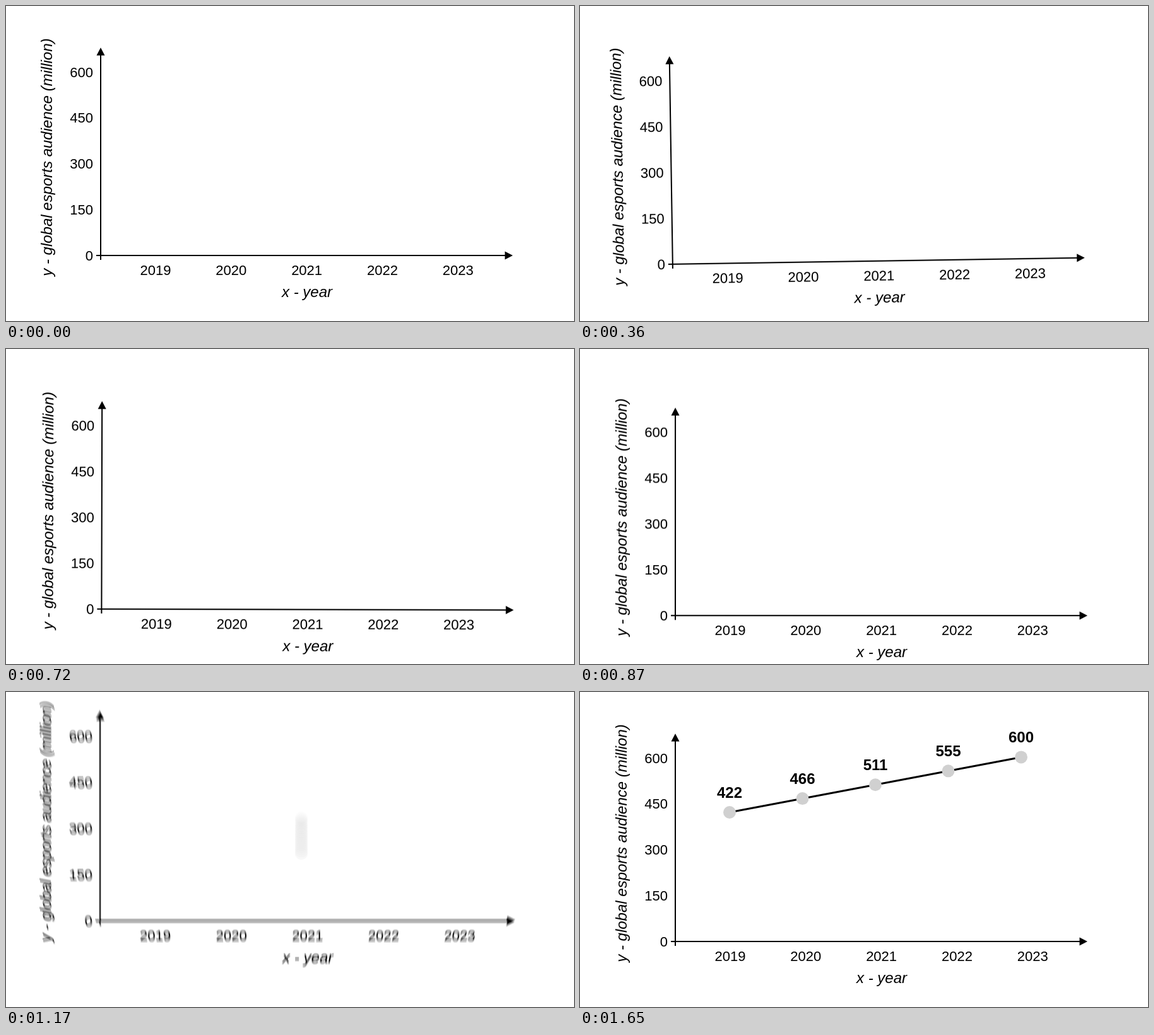
These frames come from a looping animation (900 by 500 pixels, 7200 ms). An HTML page with a canvas:

```html
<!DOCTYPE html>
<html lang="en">
<head>
<meta charset="utf-8">
<title>Audience chart</title>
<style>
  html, body { margin: 0; height: 100%; overflow: hidden; background: #fff; }
  canvas { display: block; }
</style>
</head>
<body>
<canvas id="stage" width="900" height="500"></canvas>
<script>
const LOOP = 7200, STEP = 30, END = 1650, SHUTTER = 16, SAMPLES = 20;
const SWAY_END = 870, FLING = 1123, RISE = 180;
const out = document.getElementById('stage').getContext('2d');
const layer = document.createElement('canvas');
layer.width = 900;
layer.height = 500;
const c = layer.getContext('2d');

const points = Array.from({ length: 5 }, (_, i) => {
  const value = 422 + 44.5 * i;
  return {
    value: Math.floor(value),
    x: 237 + 115.5 * i,
    y: 191 - 0.492 * (value - 422),
    start: FLING + 70 * (Math.abs(2 * i - 4) - (i < 2)) // from the middle outwards
  };
});

const part = (t, from, to) => Math.max(0, Math.min(1, (t - from) / (to - from)));

function ease(t, from, to) {
  const u = part(t, from, to);
  return u * u * (3 - 2 * u);
}

function backOut(u) {
  const s = 1.3, v = u - 1;
  return 1 + (s + 1) * v ** 3 + s * v * v;
}

// The chart sways while it crouches in two steps, leaps and lands.
function pose(t) {
  const u = part(t, 0, SWAY_END);
  const tilt = -0.93 * Math.sin(u * Math.PI * 1.32) * (1 - u ** 4);
  const land = ease(t, 1250, 1460);
  return {
    tilt: tilt * Math.PI / 180,
    x: 6.6 * tilt - (1 - u),
    y: 10.6 * ease(t, 160, 420) + 21 * ease(t, 540, 1010) - 88 * ease(t, 1010, 1250) + 56.4 * land,
    zoom: 1 + 0.02 * (ease(t, 1140, 1220) - land)
  };
}

function text(str, x, y, font, align = 'center') {
  c.font = font + ' "Liberation Sans", Arial, sans-serif';
  c.textAlign = align;
  c.fillText(str, x, y);
}

function arrow(x, y, angle, length) {
  c.save();
  c.translate(x, y);
  c.rotate(angle);
  c.fillRect(-7, -1, length - 4, 2);
  c.beginPath();
  c.moveTo(length, 0);
  c.lineTo(length - 12.5, 6.5);
  c.lineTo(length - 12.5, -6.5);
  c.fill();
  c.restore();
}

function drawAxes(t) {
  const p = pose(t);
  c.save();
  c.translate(450 + p.x, 250 + p.y);
  c.rotate(p.tilt);
  c.scale(p.zoom, p.zoom);
  c.translate(-450, -250);

  arrow(151, 396, 0, 653);
  arrow(151, 396, -Math.PI / 2, 330);
  for (let i = 0; i < 5; i++) {
    text(i * 150, 139, 403.8 - i * 72.8, '22px', 'right');
    text(2019 + i, 238 + 119.8 * i, 427, '22px');
  }
  text('x - year', 478, 462, 'italic 24px');
  c.translate(74, 240);
  c.rotate(-Math.PI / 2);
  text('y - global esports audience (million)', 0, 0, 'italic 24px');
  c.restore();
}

function drawLine(t) {
  const p = part(t, 1500, END);
  if (!p) return;
  const first = points[0], last = points[4];
  c.lineWidth = 3;
  c.beginPath();
  c.moveTo(first.x, first.y);
  c.lineTo(first.x + (last.x - first.x) * p, first.y + (last.y - first.y) * p);
  c.stroke();
}

function drawPoint({ value, x, y, start }, t) {
  if (t < start) return;
  const top = y + 360 * (1 - backOut(part(t, start, start + RISE)));
  c.fillStyle = '#d0d0d0';
  c.beginPath();
  c.arc(x, top, 10, 0, 7);
  c.fill();
  c.fillStyle = '#000';
  c.globalAlpha = part(t, start + 80, start + RISE);
  text(value, x, top - 23.5, 'bold 24px');
  c.globalAlpha = 1;
}

function drawScene(t) {
  c.fillStyle = '#fff';
  c.fillRect(0, 0, 900, 500);
  c.fillStyle = '#000';
  drawAxes(t);
  drawLine(t);
  points.forEach(p => drawPoint(p, t));
}

// Motion blur: running average of moments within the shutter time
function render(t) {
  const n = t > 0 && t < END ? SAMPLES : 1;
  for (let k = 0; k < n; k++) {
    drawScene(t + SHUTTER * ((k + 0.5) / n - 0.5));
    out.globalAlpha = 1 / (k + 1);
    out.drawImage(layer, 0, 0);
  }
}

const began = performance.now();
let shown = -1;

function tick() {
  const ms = (performance.now() - began) % LOOP;
  const t = Math.min(END, Math.floor(ms / STEP) * STEP);
  if (t !== shown) render(shown = t);
  requestAnimationFrame(tick);
}
tick();
</script>
</body>
</html>
```
